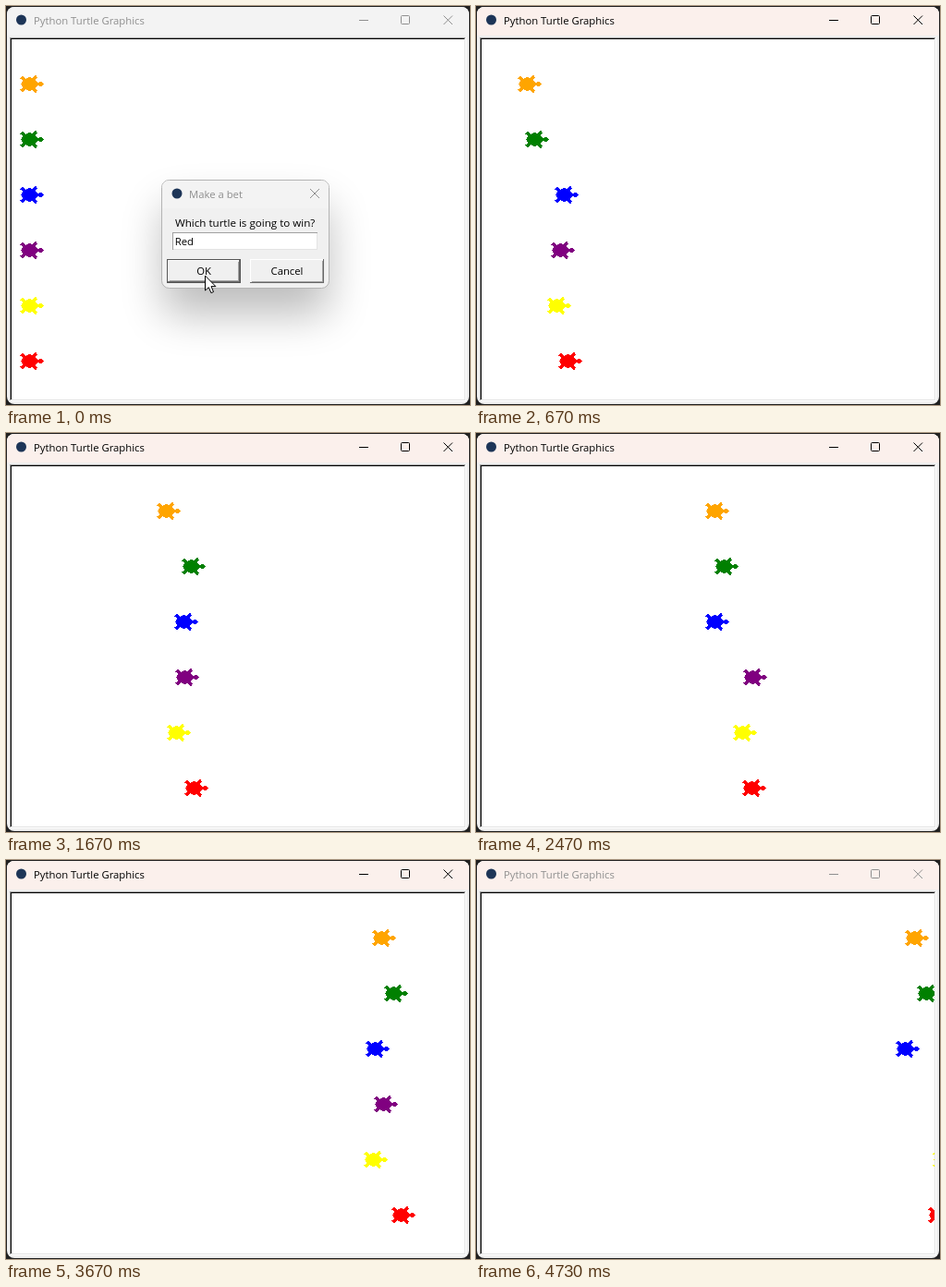
Write an HTML page that moves like this. It is 502x432 px and loops after 5000 ms.

```html
<!DOCTYPE html>
<html lang="en">
<head>
<meta charset="utf-8">
<title>Turtle race</title>
<style>
  html, body { margin: 0; width: 100%; height: 100%; overflow: hidden; background: #202020; }
  svg { display: block; width: 502px; height: 432px; }
  text { font-family: "Open Sans", "Noto Sans", sans-serif; font-size: 11.3px; }
  .crisp { shape-rendering: crispEdges; }
  .line { fill: none; stroke: currentColor; }
  .label { fill: currentColor; }
</style>
</head>
<body>
<svg viewBox="0 0 502 432">
  <defs>
    <filter id="blur" x="-60%" y="-80%" width="220%" height="260%">
      <feGaussianBlur stdDeviation="23"/>
    </filter>
    <clipPath id="canvas"><rect x="6" y="36" width="490" height="390"/></clipPath>
    <clipPath id="frame"><rect x="1" y="1" width="500" height="430" rx="8"/></clipPath>
  </defs>

  <rect width="502" height="432" fill="#202020"/>
  <g clip-path="url(#frame)">
    <rect width="502" height="432" fill="#f0f0f0"/>
    <rect width="502" height="32" fill="#f3f3f3"/>
    <rect id="tint" width="502" height="32" fill="#fbf0ec"/>
  </g>
  <circle cx="16.5" cy="15" r="5.5" fill="#1d3557"/>
  <g id="caption">
    <text class="label" x="30" y="20">Python Turtle Graphics</text>
    <path class="line" d="M382 15.5h10M473.5 10.5l9.5 9.5m0-9.5l-9.5 9.5"/>
    <rect class="line" x="427.5" y="10.5" width="9" height="9" rx="1"/>
  </g>

  <g class="crisp" fill="none">
    <rect x="4" y="34" width="494" height="394" fill="#fff"/>
    <path d="M4.5 427V34.5H497" stroke="#a0a0a0"/>
    <path d="M5.5 426V35.5H496" stroke="#000"/>
    <path d="M496.5 35V426.5H5" stroke="#e3e3e3"/>
  </g>
  <g id="field" class="crisp" clip-path="url(#canvas)"></g>

  <g id="dialog">
    <rect x="170" y="216" width="179" height="118" rx="8" opacity=".26" filter="url(#blur)"/>
    <rect x="168.5" y="188.5" width="181" height="117" rx="8" fill="#f0f0f0" stroke="#b4b4b4"/>
    <path d="M169 219V197q0-8 8-8h164q8 0 8 8v22z" fill="#f3f3f3"/>
    <circle cx="185" cy="203" r="5.5" fill="#1d3557"/>
    <g id="heading">
      <text class="label" x="198" y="208">Make a bet</text>
      <path class="line" d="M329 198l10 10m0-10l-10 10"/>
    </g>
    <text x="183" y="239" style="font-size:11.6px">Which turtle is going to win?</text>
    <g class="crisp" fill="none">
      <rect x="180" y="245" width="157" height="19" fill="#fff"/>
      <path d="M180.5 264V245.5H337" stroke="#a0a0a0"/>
      <path d="M336.5 246V263.5H181" stroke="#e3e3e3"/>
    </g>
    <text x="182.7" y="259">Red</text>
    <path id="caret" class="crisp" d="M203 248v13" stroke="#000"/>
    <g class="crisp" fill="none">
      <rect x="174.5" y="274.5" width="79" height="25" stroke="#555"/>
      <g id="raised">
        <path d="M175.5 298V275.5H252" stroke="#fff"/>
        <path d="M252.5 275V298.5H175" stroke="#696969"/>
        <path d="M251.5 277V297.5H177" stroke="#a0a0a0"/>
      </g>
      <rect id="pressed" x="176" y="276" width="76" height="22" stroke="#a0a0a0" stroke-width="2"/>
      <path d="M264.5 299V274.5H343" stroke="#fff"/>
      <path d="M343.5 274V299.5H264" stroke="#696969"/>
      <path d="M342.5 276V298.5H266" stroke="#a0a0a0"/>
    </g>
    <text id="ok" y="291" text-anchor="middle">OK</text>
    <text x="304" y="291" text-anchor="middle">Cancel</text>
  </g>

  <path id="pointer" d="M0 0V16L3.8 12.6L6.4 18.6L9 17.5L6.5 11.6H11.4Z" fill="#fff" stroke="#000"/>
</svg>
<script>
const LOOP = 5000;
const LAST_MOVE = 81;
const $ = id => document.getElementById(id);
const ramp = (t, from, to) => Math.min(1, Math.max(0, (t - from) / (to - from)));
const show = (id, on) => $(id).setAttribute("visibility", on ? "inherit" : "hidden");

// Bottom lane first: mean step, and a slow sway around it for luck.
const racers = [
  { color: "red",    step: 34.2, sway: 8,   rate: 0.4 },
  { color: "yellow", step: 33.6, sway: -9,  rate: 0.31 },
  { color: "purple", step: 34.6, sway: -5,  rate: 0.33 },
  { color: "blue",   step: 33.7, sway: 3,   rate: 0.7 },
  { color: "green",  step: 35.4, sway: 4.5, rate: 0.7 },
  { color: "orange", step: 33.8, sway: -10, rate: 0.39 }
];
const distance = (r, round) => r.step * round + r.sway * Math.sin(r.rate * round);

// Half of the turtle outline, nose to tail; mirrored for the rest.
const half = [[16, 0], [14, -2], [10, -1], [7, -4], [9, -7], [8, -9], [5, -6], [1, -7],
              [-3, -5], [-6, -8], [-8, -6], [-5, -4], [-7, 0]];
const outline = half.concat(half.slice(1, -1).reverse().map(([x, y]) => [x, -y])).join(" ");

const turtles = racers.map(({ color }) => {
  const shape = document.createElementNS("http://www.w3.org/2000/svg", "polygon");
  shape.setAttribute("points", outline);
  shape.setAttribute("fill", color);
  shape.setAttribute("stroke", color);
  return $("field").appendChild(shape);
});

// The screen refreshes 15 times a second, on a 10 ms clock.
function tick(t) {
  const m = t % 200;
  return t - m + (m >= 130 ? 130 : m >= 70 ? 70 : 0);
}

// Turtles move in turn, slowing slightly over the race.
function movesDone(t) {
  const s = Math.max(0, t - 170) / 1000;
  return Math.min(LAST_MOVE, 20.15 * s - 0.29 * s * s);
}

// Each move is drawn in three hops.
function position(racer, lane, moves) {
  const turn = Math.max(0, moves - lane);
  const round = Math.floor(turn / racers.length);
  const hops = Math.min(3, Math.floor((turn % racers.length) * 4)) / 3;
  const from = distance(racer, round);
  return from + (distance(racer, round + 1) - from) * hops;
}

function draw(time) {
  const t = tick(time);
  const moves = movesDone(t);
  turtles.forEach((shape, lane) => {
    const x = 24 + Math.round(position(racers[lane], lane, moves));
    shape.setAttribute("transform", `translate(${x} ${384.5 - 60 * lane})`);
  });

  const active = t >= 200 && time < 4730;
  $("caption").style.color = active ? "#000" : "#8f8f8f";
  $("tint").setAttribute("opacity", ramp(t, 200, 400));

  const clicked = t >= 70;
  $("heading").style.color = clicked ? "#000" : "#8f8f8f";
  $("ok").setAttribute("x", clicked ? 215 : 214);
  show("caret", clicked);
  show("pressed", clicked);
  show("raised", !clicked);

  const fade = ramp(t, 150, 390);
  const scale = 1 - 0.066 * fade;
  $("dialog").setAttribute("opacity", 1 - fade);
  $("dialog").setAttribute("transform", `translate(183 228) scale(${scale}) translate(-183 -228)`);
  show("dialog", fade < 1);

  const glide = ramp(t, 130, 270);
  $("pointer").setAttribute("transform", `translate(${215.5 + 257 * glide} ${292 + 15 * glide})`);
  show("pointer", t < 330);
}

const start = performance.now();
function loop() {
  draw((performance.now() - start) % LOOP);
  requestAnimationFrame(loop);
}
draw(0);
requestAnimationFrame(loop);
</script>
</body>
</html>
```
